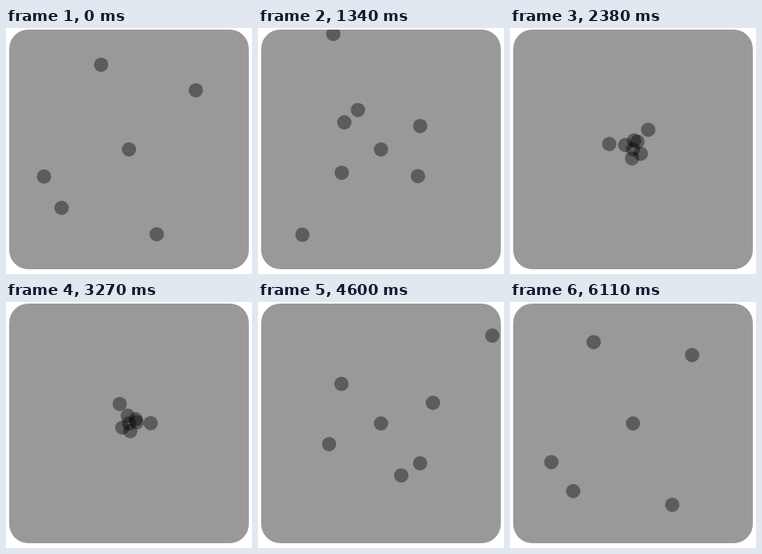
An HTML page that plays this animation: 308 px wide and 308 px high, repeating every 6.21 s.

```html
<!DOCTYPE html>
<html>
<head>
<meta charset="utf-8">
<title>Spiralling dots</title>
<style>
html, body { margin: 0; height: 100%; overflow: hidden; background: #fff; }
svg { display: block; width: 100%; height: 100%; }
</style>
</head>
<body>
<svg viewBox="0 0 308 308">
  <clipPath id="card"><rect x="4" y="2" width="300" height="300" rx="24"/></clipPath>
  <g clip-path="url(#card)">
    <rect x="4" y="2" width="300" height="300" fill="#999"/>
    <g id="dots" transform="translate(154 152)" fill-opacity=".4"><circle r="9"/></g>
  </g>
</svg>
<script>
const LOOP = 6210, STEP = 148.3, LAST = 41, LAST_START = 6110;

// Start angle in degrees, radius factor, radius offset
const orbits = [
  [251.8, 1, 0], [-41.5, 1, 0], [71.9, 1, 0], [139.1, 1, 0], [162.3, 1, 0],
  [170.2, 2.73, 0.5], [55.3, 2.5, 2.5]
];

const group = document.getElementById('dots');
const dots = orbits.map(([deg, factor, offset]) => {
  const el = group.appendChild(group.firstElementChild.cloneNode());
  return { el, start: deg * Math.PI / 180, factor, offset };
});

function draw(now) {
  const t = now % LOOP;
  const step = t < LAST_START ? Math.min(LAST - 1, Math.floor(t / STEP)) : LAST;
  const turn = step * 0.15;
  const reach = 59.3 + 52.4 * Math.cos(turn) - 14 * Math.sin(turn);
  for (const { el, start, factor, offset } of dots) {
    const r = reach * factor + offset;
    el.setAttribute('cx', r * Math.cos(start + turn));
    el.setAttribute('cy', r * Math.sin(start + turn));
  }
}

const begin = performance.now();
function tick() {
  draw(performance.now() - begin);
  requestAnimationFrame(tick);
}
tick();
</script>
</body>
</html>
```
